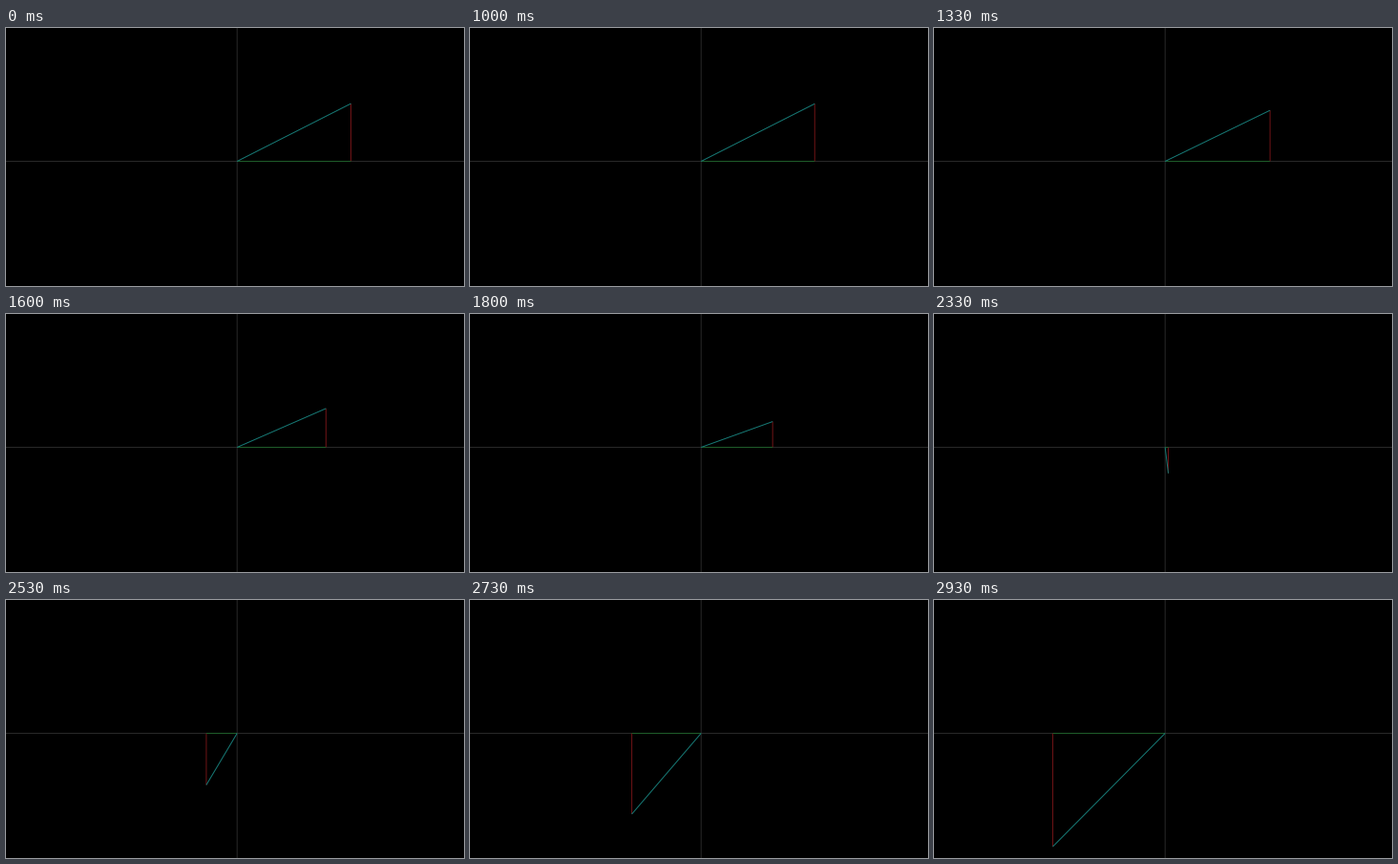
Animation of 480 by 270 pixels, one loop 3740 ms. Source, as a matplotlib script:

```python
import matplotlib.pyplot as plt
from matplotlib.animation import FuncAnimation

W, H, DPI = 480, 270, 100
PX = 72 / DPI                       # one pixel in points
TICK, FRAMES = 10, 374              # ms per frame, frames per loop
HOLD, STEPS_PER_TICK, LAST = 100, 0.15, 29
OX, OY = 242.2, 139.5               # origin on the stage
START = (361.5, 79.1)
TRAVEL = (-239.4, 180.8)

AXIS, CYAN, RED, LEG = "#282828", "#177a76", "#701416", "#1e5c2a"

fig = plt.figure(figsize=(W / DPI, H / DPI), dpi=DPI, facecolor="black")
ax = fig.add_axes([0, 0, 1, 1])
ax.set(xlim=(0, W), ylim=(H, 0))
ax.axis("off")


def stroke(color, xs=(), ys=(), z=2):
    line, = ax.plot(xs, ys, color=color, lw=PX, zorder=z, snap=False,
                    solid_capstyle="butt")
    return line


stroke(AXIS, (0, W), (OY, OY), 1)
stroke(AXIS, (OX, OX), (0, H), 1)
rise = stroke(RED, z=2)
run = stroke(LEG, z=3)
slope = stroke(CYAN, z=4)


def tip(frame):
    """End of the vector: held, then accelerating in 15 fps steps."""
    if frame < HOLD:
        return START
    step = min(int((frame - HOLD + 0.4) * STEPS_PER_TICK), LAST)
    p = ((step + 0.95) / 30.1) ** 2
    return START[0] + TRAVEL[0] * p, START[1] + TRAVEL[1] * p


def update(frame):
    x, y = tip(frame)
    run.set_data((OX, x), (OY, OY))
    rise.set_data((x, x), (OY, y))
    slope.set_data((OX, x), (OY, y))
    return run, rise, slope


anim = FuncAnimation(fig, update, frames=FRAMES, interval=TICK,
                     repeat=True, repeat_delay=0, blit=False)
plt.show()
```
